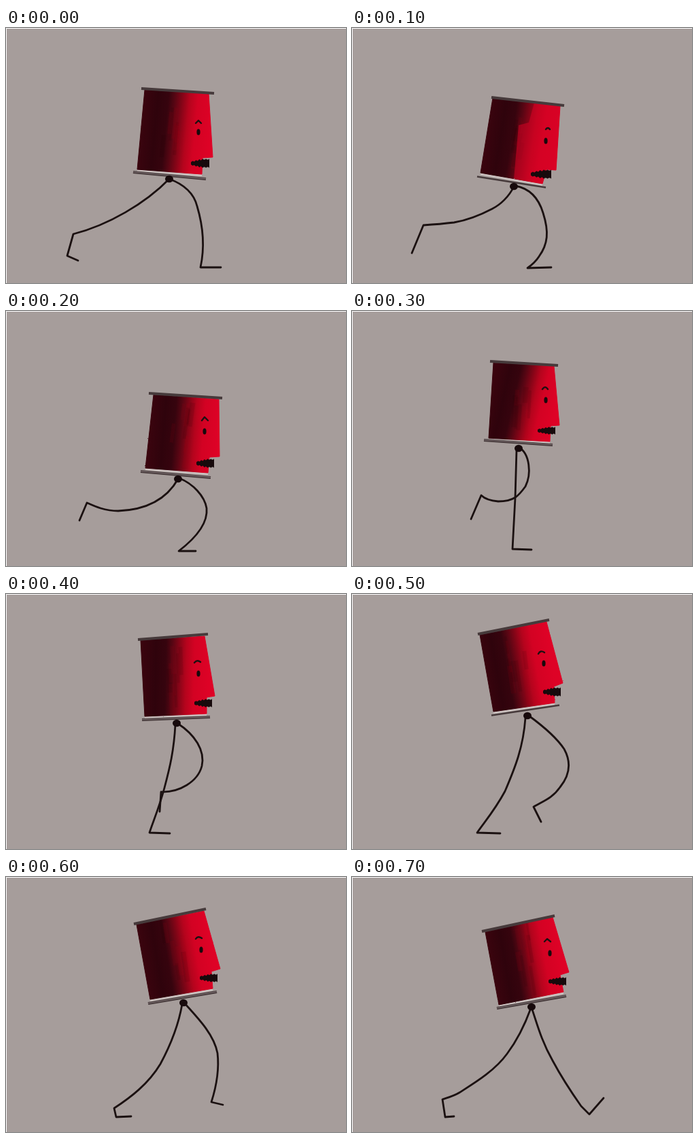
These frames come from a looping animation (500 px wide and 375 px high, 0.8 s). An HTML page:

```html
<!DOCTYPE html>
<html lang="en">
<head>
<meta charset="utf-8">
<title>Walking spool</title>
<style>
  html, body { margin: 0; width: 100%; height: 100%; overflow: hidden; background: #a69d9b; }
  svg { display: block; width: 100vw; height: 100vh; }
  .pose { visibility: hidden; animation: show 800ms step-end infinite; animation-delay: calc(var(--i) * 100ms - 800ms); }
  @keyframes show { 0% { visibility: visible; } 12.5%, 100% { visibility: hidden; } }
  .leg, .brow { fill: none; stroke: #1b1111; stroke-width: 2.8; stroke-linecap: round; stroke-linejoin: round; }
  .brow { stroke-width: 2.4; }
  .ink { fill: #170a0c; }
  .rim { stroke: #463a3b; stroke-width: 4; }
  .shine { stroke: #75686a; stroke-width: 1.2; }
  .paper { stroke: #cdc3c1; stroke-width: 2.4; }
</style>
</head>
<body>
<svg id="stage" viewBox="0 0 500 375" preserveAspectRatio="none"></svg>
<script>
// body: top left, top right, nose, lip, bottom right, bottom left
// shade: direction of the shading; mouth: left, top, right, bottom
const poses = [
  { body: [204,91, 298,96, 304,190, 289,191, 288,215, 193,208], shade: [198,150, 301,160],
    top: [199,89, 306,96], base: [187,212, 294,222], eye: [283,153], brow: 'M279 140L283 136L287 140',
    mouth: [272,192, 299,206], hip: [240,222],
    legs: ['M240 222C205 258 150 290 99 303L90 335L106 342',
           'M240 222C262 230 276 242 281 262C290 292 293 320 286 352H316'] },
  { body: [207,103, 306,115, 300,209, 286,208, 280,229, 189,213], shade: [197,159, 303,176],
    top: [205,102, 312,114], base: [184,218.5, 285,234.5], eye: [285,166], brow: 'M285 149Q288 145 291 149',
    mouth: [263,208, 293,222], hip: [238,233], thin: 1,
    patch: 'M268 110L260 139L245 143L238 222L280 229L286 208L300 209L306 115Z',
    legs: ['M238 233C231 248 218 260 206 266C185 277 168 283 150 286C133 288 120 289 105 290L88 331',
           'M240 232C262 236 275 252 281 272C290 300 288 318 275 336C270 344 265 348 258 353L293 352'] },
  { body: [217,123, 313,130, 314,214, 299,215, 297,238, 205,231], shade: [211,178, 313,186],
    top: [210,121, 318,128], base: [198,236, 301,245], eye: [292,177], brow: 'M288 161L292 156L297 161',
    mouth: [280,217, 306,231], hip: [253,247],
    legs: ['M253 247C240 270 215 292 165 294C145 294 130 287 119 282L108 308',
           'M255 246C275 254 292 272 295 290C297 310 284 330 254 353H279'] },
  { body: [208,76, 297,81, 305,168, 292,169, 291,192, 201,187], shade: [203,125, 300,147],
    top: [203,74, 303,80], base: [194,190, 295,197], eye: [285,131], brow: 'M280 115Q284 109 288 115',
    mouth: [273,170, 299,182], hip: [245,202],
    legs: ['M242 204L240 275L236 350L264 351',
           'M245 200C262 210 264 240 255 258C245 272 238 280 215 280C203 279 195 276 190 271L175 306'] },
  { body: [198,68, 292,62, 307,150, 295,152, 295,176, 204,180], shade: [200,120, 299,122],
    top: [194,67, 297,59], base: [200,185, 300,181], eye: [283,117], brow: 'M277 101Q281 96 286 100',
    mouth: [277,154, 303,167], hip: [251,190],
    legs: ['M249 192C247 230 241 255 233 285C225 315 216 335 211 351L241 352',
           'M252 190C278 207 293 230 288 253C282 276 255 292 228 291L226 320'] },
  { body: [188,60, 286,41, 310,131, 297,136, 298,160, 208,173], shade: [193,118, 294,100],
    top: [185,59, 290,38], base: [205,178.5, 305,163.5], eye: [282,102], brow: 'M274 88Q277 82 283 86',
    mouth: [281,137, 307,151], hip: [258,179], thin: 1,
    legs: ['M255 182C252 225 240 255 225 290C210 318 195 335 184 351L218 352',
           'M260 179C282 195 302 213 312 228C324 250 319 268 306 284C294 301 282 304 267 313L278 335'] },
  { body: [192,70, 291,50, 315,135, 302,139, 304,164, 212,180], shade: [202,125, 303,108],
    top: [188,69, 294,47], base: [209,186, 310,169], eye: [287,107], brow: 'M279 91Q282 86 288 90',
    mouth: [285,142, 311,155], hip: [261,185],
    legs: ['M259 187C253 222 241 249 227 275C209 305 182 325 159 340L162 353L184 352',
           'M262 185C283 208 306 232 311 259C314 285 309 309 302 331L319 335'] },
  { body: [196,81, 295,59, 319,140, 306,144, 311,169, 216,188], shade: [206,135, 307,117],
    top: [191,80, 298,57], base: [213,193, 315,175], eye: [291,112], brow: 'M283 95L287 91L292 95',
    mouth: [289,147, 315,160], hip: [264,191],
    legs: ['M263 193C255 215 243 240 228 260C210 285 180 303 158 317C150 322 142 324 133 327L137 353L150 352',
           'M264 192C272 215 278 240 295 270C310 298 325 320 337 337L349 349L370 325'] }
];

const tones = [[0, '#3a040e'], [.2, '#2f030c'], [.35, '#36040e'], [.44, '#560613'],
               [.54, '#820517'], [.65, '#b5041d'], [.77, '#d30223'], [1, '#de0226']];

let seed = 7;
const rand = () => (seed = seed * 16807 % 2147483647) / 2147483647;
const line = ([x1, y1, x2, y2], cls, dy = 0, attrs = '') =>
  `<line class="${cls}" x1="${x1}" y1="${y1 + dy}" x2="${x2}" y2="${y2 + dy}" ${attrs}/>`;

// Soft brush marks running parallel to the left edge
function brush([ax, ay, bx, by, , , , , cx, cy, dx, dy]) {
  let out = '';
  for (let k = 0; k < 8; k++) {
    const u = .36 + rand() * .28, v = rand() * .6, w = v + .2 + rand() * .25;
    const at = t => {
      const x = ax + (bx - ax) * u, y = ay + (by - ay) * u;
      return `${(x + (dx + (cx - dx) * u - x) * t).toFixed(1)} ${(y + (dy + (cy - dy) * u - y) * t).toFixed(1)}`;
    };
    out += `<path d="M${at(v)}L${at(w)}" stroke="${rand() < .5 ? '#1e0007' : '#b0041c'}" stroke-width="${(3 + rand() * 5).toFixed(1)}" opacity=".1"/>`;
  }
  return out;
}

// Ragged moustache, thinner at the left and full at the right
function moustache([l, t, r, b]) {
  const mid = (t + b) / 2, n = 11, up = [], down = [];
  for (let k = 0; k <= n; k++) {
    const x = l + (r - l) * k / n;
    const h = (b - t) / 2 * Math.min(.95, .4 + k / n) * (k % 2 ? 1 : .65);
    up.push(`${x.toFixed(1)},${(mid - h).toFixed(1)}`);
    down.unshift(`${x.toFixed(1)},${(mid + h).toFixed(1)}`);
  }
  return `<polygon class="ink" points="${up.concat(down).join(' ')}"/>
    <rect class="ink" x="${r - 12}" y="${t + 1.5}" width="12" height="${b - t - 3}" rx="2"/>`;
}

function draw(p, i) {
  const [x1, y1, x2, y2] = p.shade;
  const stops = tones.map(([o, c]) => `<stop offset="${o}" stop-color="${c}"/>`).join('');
  const rim = p.thin ? 'style="stroke-width:2.6"' : '';
  const strip = [p.body[10], p.body[11], p.body[8], p.body[9]];
  return `<g class="pose" style="--i:${i}">
    <linearGradient id="g${i}" gradientUnits="userSpaceOnUse" x1="${x1}" y1="${y1}" x2="${x2}" y2="${y2}">${stops}</linearGradient>
    <clipPath id="c${i}"><polygon points="${p.body}"/></clipPath>
    ${p.legs.map(d => `<path class="leg" d="${d}"/>`).join('')}
    ${line(strip, 'paper', 1.8)}
    <g filter="url(#rough)">
      <polygon points="${p.body}" fill="url(#g${i})" stroke="url(#g${i})"/>
      <g clip-path="url(#c${i})">${brush(p.body)}</g>
      ${p.patch ? `<path d="${p.patch}" fill="#d80325" opacity=".55"/>` : ''}
    </g>
    ${line(p.top, 'rim')}${line(p.base, 'rim', 0, rim)}
    ${p.thin ? '' : line(p.base, 'shine', -.4)}
    <ellipse class="ink" cx="${p.eye[0]}" cy="${p.eye[1]}" rx="2.6" ry="4.5"/>
    <path class="brow" d="${p.brow}"/>
    ${moustache(p.mouth)}
    <ellipse class="ink" cx="${p.hip[0]}" cy="${p.hip[1]}" rx="6" ry="5.3"/>
  </g>`;
}

document.getElementById('stage').innerHTML = `
  <filter id="rough" x="-10%" y="-10%" width="120%" height="120%" color-interpolation-filters="sRGB">
    <feTurbulence type="fractalNoise" baseFrequency=".3" numOctaves="2" seed="4"/>
    <feDisplacementMap in="SourceGraphic" scale="1.5" xChannelSelector="R" yChannelSelector="G"/>
  </filter>
  <rect width="500" height="375" fill="#a69d9b"/>
  ${poses.map(draw).join('')}
  <path d="M.5 375V.5H500" fill="none" stroke="#fff"/>`;
</script>
</body>
</html>
```
